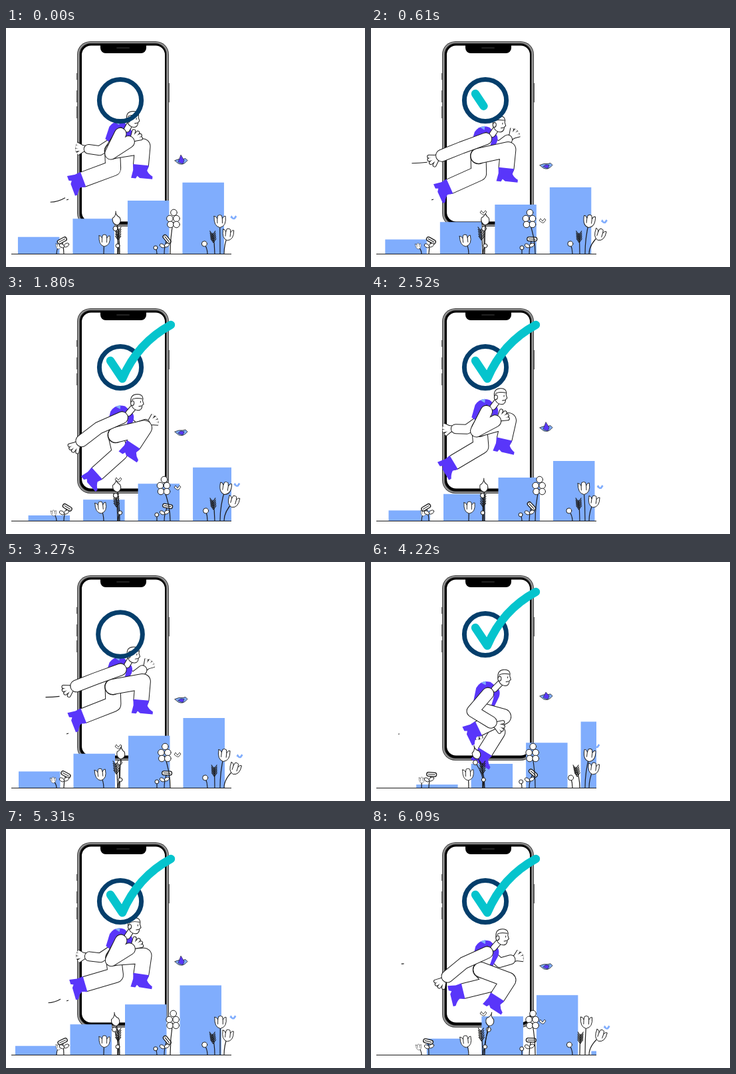
Recreate the animation shown at these times as an HTML page with a canvas. Size 540 by 360 pixels, loop 6.13 s.

```html
<!DOCTYPE html>
<html lang="en">
<head>
<meta charset="utf-8">
<title>Climbing steps</title>
<style>
  html, body { margin: 0; width: 540px; height: 360px; overflow: hidden; background: #fff; }
  canvas { display: block; }
</style>
</head>
<body>
<canvas id="stage" width="540" height="360"></canvas>
<script>
const c = document.getElementById('stage').getContext('2d');
const LOOP = 6130, STEP = 657, GAP = 82.5;
const BLUE = '#80adfd', PURPLE = '#5936fa', INK = '#1c1c1c', NAVY = '#043e6b', TEAL = '#05c4cd';
const { PI, sin, cos, max, min, hypot, atan2 } = Math;

// T counts footsteps; a wave repeats every two of them and is highest at `peak`
let T = 0;
const wave = (mid, amp, peak = 0) => mid + amp * cos(PI * (T - peak));

function paint(fill, stroke = INK, width = 1) {
  if (fill) { c.fillStyle = fill; c.fill(); }
  if (stroke) { c.strokeStyle = stroke; c.lineWidth = width; c.stroke(); }
}
function line(points, stroke, width) {
  c.beginPath();
  points.forEach(p => c.lineTo(...p));
  paint(null, stroke, width);
}
function oval(x, y, rx, ry = rx, turn = 0) {
  c.beginPath();
  c.ellipse(x, y, rx, ry, turn, 0, 2 * PI);
  paint('#fff');
}
function box(x, y, w, h, r, fill) {
  c.beginPath();
  c.roundRect(x, y, w, h, r);
  paint(fill, null);
}
function curve(d, fill, stroke = INK, width = 1) {
  const p = new Path2D(d);
  if (fill) { c.fillStyle = fill; c.fill(p); }
  if (stroke) { c.strokeStyle = stroke; c.lineWidth = width; c.stroke(p); }
}
function at(x, y, turn, draw) {
  c.save();
  c.translate(x, y);
  c.rotate(turn);
  draw();
  c.restore();
}

function phone() {
  for (const [x, y, h] of [[106, 68, 10], [106, 94, 18], [106, 118, 18], [244, 83, 29]]) {
    box(x, y, 2, h, 0, '#666');
  }
  box(107, 20, 138, 279, 20, '#3a3a3a');
  box(108, 21, 136, 277, 19, '#a5a5a5');
  box(109.5, 22, 133, 275, 18, '#6a6a6a');
  box(111, 23.5, 130, 272, 16, '#000');
  box(114, 26.5, 125, 265, 14, '#fff');
  box(142, 24, 69, 14, [0, 0, 8, 8], '#000');
  box(166, 29, 20, 2, 1, '#222');
}

// Bars dip between footsteps, the right ones later; a new one shoots up at the right edge
function bars() {
  const u = T % 1;
  c.save();
  c.beginPath();
  c.rect(9, 0, 330, 340);
  c.clip();
  for (let j = 0; j < 6; j++) {
    const x = 18 + GAP * (j - u);
    const dip = 40 * sin(PI * u ** (.8 + .22 * j));
    const top = 287 + (101 - x) * .33 + dip + 8 * max(0, x - 317);
    if (top < 340) box(x, top, 62.5, 340 - top, 0, BLUE);
  }
  c.restore();
}

function limb(points, width) {
  c.lineCap = 'round';
  line(points, INK, width + 2);
  line(points, '#fff', width);
}
function hand() {
  for (const [color, width] of [[INK, 6], ['#fff', 4]]) {
    for (const a of [-.9, -.35, .1, .5]) line([[2, 0], [5 + 12 * cos(a), 12 * sin(a)]], color, width);
    line([[0, 0], [7, 0]], color, width + 4);
  }
}
// Angles are in degrees from straight down, positive towards the back
function arm([sx, sy], upper, reach, fore, length, width) {
  const turn = a => a * PI / 180;
  const ex = sx - reach * sin(turn(upper)), ey = sy + reach * cos(turn(upper));
  const hx = ex - length * sin(turn(fore)), hy = ey + length * cos(turn(fore));
  at(hx, hy, atan2(hy - ey, hx - ex), () => { c.translate(3, 0); hand(); });
  limb([[sx, sy], [ex, ey], [hx, hy]], width);
}

// The ankle runs round a loop below the hip; the knee bends forwards to suit
function pose(t) {
  const swing = cos(PI * t);
  const x = 35 * swing + 8 * cos(3 * PI * t);
  const y = 38 + 25 * cos(PI * (t - .65)) - 7 * cos(2 * PI * t);
  const thigh = 36 + 10 * swing, shin = 73 - thigh;
  const d = hypot(x, y);
  const along = (thigh ** 2 - shin ** 2 + d ** 2) / (2 * d);
  const bend = Math.sqrt(max(0, thigh ** 2 - along ** 2));
  return { knee: [(x * along + y * bend) / d, (y * along - x * bend) / d], ankle: [x, y] };
}
function leg(hip, { knee, ankle }) {
  at(...hip, 0, () => {
    limb([[0, 0], knee, ankle], 22);
    at(...ankle, atan2(ankle[1] - knee[1], ankle[0] - knee[0]) - PI / 2, () =>
      curve('M-12 1H12L10 9Q13 14 19 17V21H0L-4 18-6 22H-13L-11 10Z', PURPLE, null));
  });
}

function person() {
  const drop = sin(PI * (T % 1)) ** .8;
  const [hx, hy] = [190 + 10 * drop, 137 + 39 * drop];
  const [sx, sy] = [174 + 4 * drop, 158 + 41 * drop];
  const hip = [160 + 8 * drop, 185 + 41 * drop];
  const lean = atan2(hip[1] - sy, hip[0] - sx) - PI / 2;
  const [back, front] = [pose(T), pose(T + 1)].sort((a, b) => a.knee[0] - b.knee[0]);

  arm([sx + 3, sy + 3], wave(0, 57), wave(30, 13), wave(-15, 113), 17, 13);
  leg(hip, back);
  at(sx, sy, lean, () => {
    curve('M-4-16Q-19-14-21 0L-18 19-5 22 8-12Z', PURPLE, null);
    curve('M-17-10L-11-15-9-9Z', BLUE, null);
  });
  limb([[sx + 2, sy + 3], hip], 23);
  at(sx, sy, lean, () => curve('M-6-12Q15-16 16 0L14 20 9 23Q11 4 5-5L-4-7Z', PURPLE, null));
  leg(hip, front);

  limb([[sx + 8, sy - 6], [hx - 3, hy + 6]], 8);
  at(hx, hy, .08, () => {
    curve('M-8 3C-11-8-6-12 1-12S10-8 9-3L11 2 9 4Q9 12 3 12-5 12-8 3Z', '#fff');
    curve('M-7-3Q-4-7 8-6M6-2V0M4 6 8 5');
    oval(-6, 2, 2.5, 3.5);
  });
  arm([sx - 2, sy + 1], wave(48, -22), wave(36, -3), wave(-27, -96), 32, 17);
}

function stem(bx, x, y) {
  curve(`M${bx} 340Q${bx} ${(y + 340) / 2} ${x} ${y}`, null, INK, 1.2);
}
function tulip(bx, x, y, size) {
  stem(bx, x, y);
  at(x, y, (x - bx) * .02, () => {
    c.scale(size, size);
    curve('M-9-9Q-6-10-4-5L-3-10Q0-12 3-10L4-5Q6-10 9-9 11 7 0 9-10 7-9-9ZM-4-5V2M4-5V2', '#fff');
  });
}
function pill(bx, x, y, turn) {
  stem(bx, x, y);
  at(x, y, turn, () => {
    c.beginPath();
    c.roundRect(-7.5, -3, 15, 6, 3);
    paint('#fff', INK, 1.3);
    curve('M-5 0H5');
  });
  oval(bx - 3, 328, 4, 2.5, .5);
  oval(bx + 4, 327, 4, 2.5, -.5);
}
function ball(bx, x, y, r) {
  stem(bx, x, y);
  oval(x, y, r);
}
function sprig(bx, x, y) {
  stem(bx, x, y);
  for (let i = 0; i < 5; i++) {
    const mx = x + (bx - x) * i / 11, my = y + (340 - y) * i / 11;
    curve(`M${mx - 4} ${my - 3}L${mx} ${my + 3} ${mx + 4} ${my - 3}`, null, INK, 1.2);
  }
}
function plants() {
  tulip(76, wave(75, 4), 329, .45);
  pill(87, wave(87, 6, .65), 320, wave(0, .55, .85));
  tulip(147, wave(145, 3), 321, .9);

  const bulb = wave(170, 11, 1.4);
  sprig(168, wave(167, 2), 303);
  ball(170, bulb - 2, 302, 3.5);
  stem(171, bulb, 290);
  at(bulb, 290, (bulb - 171) * .025, () => curve('M0-14Q-1-8 5-4 8 4 0 7-8 4-6-4 0-7 0-14Z', '#fff'));
  ball(168, wave(170, 2, 1), 328, 3);

  ball(227, wave(226, 1, 1), 331, 3);
  pill(238, wave(242, 2, .5), 318, wave(.45, .45, .1));
  const cluster = wave(245, 8, 1.8);
  stem(247, cluster, 292);
  for (const [x, y] of [[1, -11], [-5, -2], [5, -2], [-4, 7], [5, 7]]) oval(cluster + x, 289 + y, 4.8);

  ball(303, wave(299, 2, .6), 325, 4);
  sprig(314, wave(312, 4, 1.4), 309);
  tulip(322, wave(324.5, 6, .66), 292, .95);
  tulip(328, wave(339, 6, 1.16), 312, .9);
}

function bird() {
  const flap = wave(4.5, 4);
  at(264, wave(203, -3.5), 0, () => {
    curve('M-10 0Q-4-3 2-2L6-3 9 0 6 3Q2 7-4 5Z', BLUE, INK, .8);
    curve(`M-5 2L-1 ${-flap} 4 0 2 5Z`, PURPLE, INK, .6);
  });
}
function butterflies() {
  const x = wave(346, 8, 1.3), y = wave(292, 12, 1.4);
  const wings = (dx, dy) => `M${dx} ${dy}l-4-3 2-3 3 4 3-4 2 2-3 4z`;
  curve(wings(x, y), BLUE, null);
  if (Math.abs(T % 2 - 1) < .25) {
    curve(wings(168, 281), '#fff', INK, .8);
    curve(wings(257, 293), '#fff', INK, .8);
  }
}
function gust(u, x, y, bend) {
  if (u > .5) return;
  const left = x - u * 65, length = max(1.5, 24 - u * 80), lift = bend * length / 24;
  curve(`M${left} ${y + lift}q${length / 2} 0 ${length} ${-2 * lift}`, null, INK, 1.1);
}
function wind() {
  gust((T + 1.05) % 2, 62, 203, .7);
  gust((T + .02) % 2, 68, 259, 3.5);
  if ((T + .07) % 1 < .2) curve('M91 259l3-1', null, INK, 1.2);
}

function badge(ms) {
  const grow = 1 + .055 * sin(PI * min(1, ms / 410));
  c.beginPath();
  c.arc(172, 109, 31.6 * grow, 0, 2 * PI);
  paint(null, NAVY, 7);
  const drawn = min(1, (ms - 540) / 460);
  if (drawn <= 0) return;
  c.lineCap = 'round';
  c.setLineDash([145 * drawn, 300]);
  curve('M157 99L175 126Q198 72 248 45', null, TEAL, 12.5);
  c.setLineDash([]);
}

const start = performance.now();
function frame(now) {
  const ms = max(0, now - start) % LOOP, p = ms / STEP;
  T = p - .07 * sin(2 * PI * p);
  c.clearRect(0, 0, 540, 360);
  c.lineJoin = 'round';
  c.lineCap = 'butt';
  phone();
  bars();
  wind();
  person();
  plants();
  bird();
  butterflies();
  box(8, 340, 331, 1, 0, INK);
  badge(ms % (LOOP / 2));
  requestAnimationFrame(frame);
}
requestAnimationFrame(frame);
</script>
</body>
</html>
```
